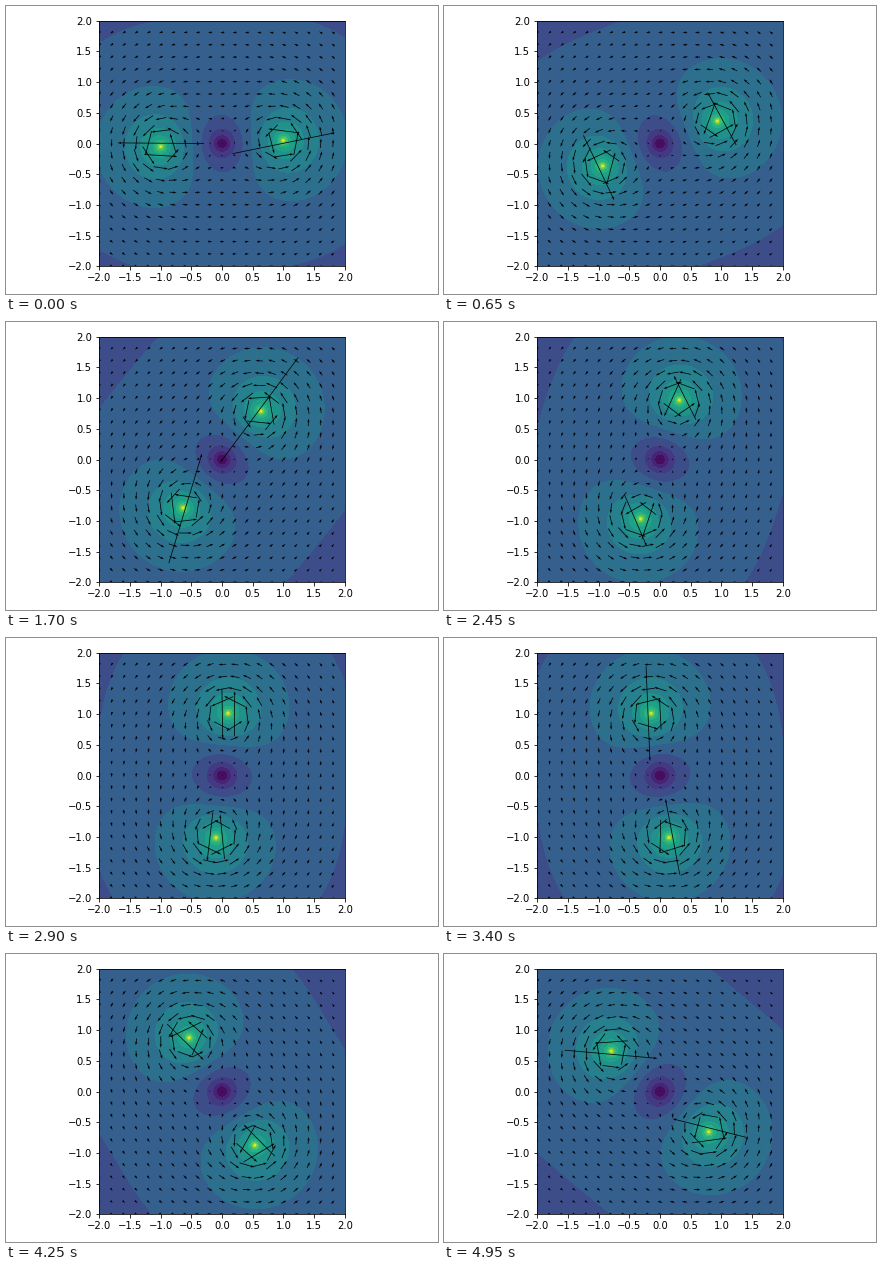
Animation, 432 px wide and 288 px high, one loop 5 s. Source, as a matplotlib script:

```python
import numpy as np
import matplotlib.pyplot as plt
from matplotlib.animation import FuncAnimation

FRAMES, INTERVAL = 100, 50
DT = 0.05
LEVELS = np.arange(-2.25, 5.5, 0.5)

axis = np.linspace(-2, 2, 400)
X, Y = np.meshgrid(axis, axis)
Z = X + 1j * Y
coarse = (slice(None, None, 20),) * 2


def induced(z, vortex):
    """Complex velocity at z caused by a unit vortex."""
    d = z - vortex
    return 1j * d / np.abs(d) ** 2


def vortex_path(steps):
    """Euler steps of two equal vortices circling each other."""
    a, b = 1 + 0j, -1 + 0j
    path = []
    for _ in range(steps):
        va, vb = induced(a, b), induced(b, a)
        a, b = a + DT * va, b + DT * vb
        path.append((a, b))
    return path


PATH = vortex_path(FRAMES + 1)[1:]

fig, ax = plt.subplots(figsize=(6, 4), dpi=72)
ax.set_aspect("equal")
ax.set(xlim=(-2, 2), ylim=(-2, 2))
ticks = np.arange(-2, 2.1, 0.5)
ax.set_xticks(ticks)
ax.set_yticks(ticks)
fig.tight_layout()

arrows = ax.quiver(X[coarse], Y[coarse], X[coarse], Y[coarse],
                   pivot="mid", scale=51.5, width=0.003, zorder=1)
fills = []


def draw(i):
    flow = sum(induced(Z, v) for v in PATH[i])
    while fills:
        fills.pop().remove()
    strength = np.clip(np.log(np.abs(flow)), LEVELS[0], LEVELS[-1])
    fills.append(ax.contourf(X, Y, strength, levels=LEVELS, zorder=0))
    arrows.set_UVC(flow[coarse].real, flow[coarse].imag)


anim = FuncAnimation(fig, draw, frames=FRAMES, interval=INTERVAL,
                     repeat=True, repeat_delay=0)
plt.show()
```
